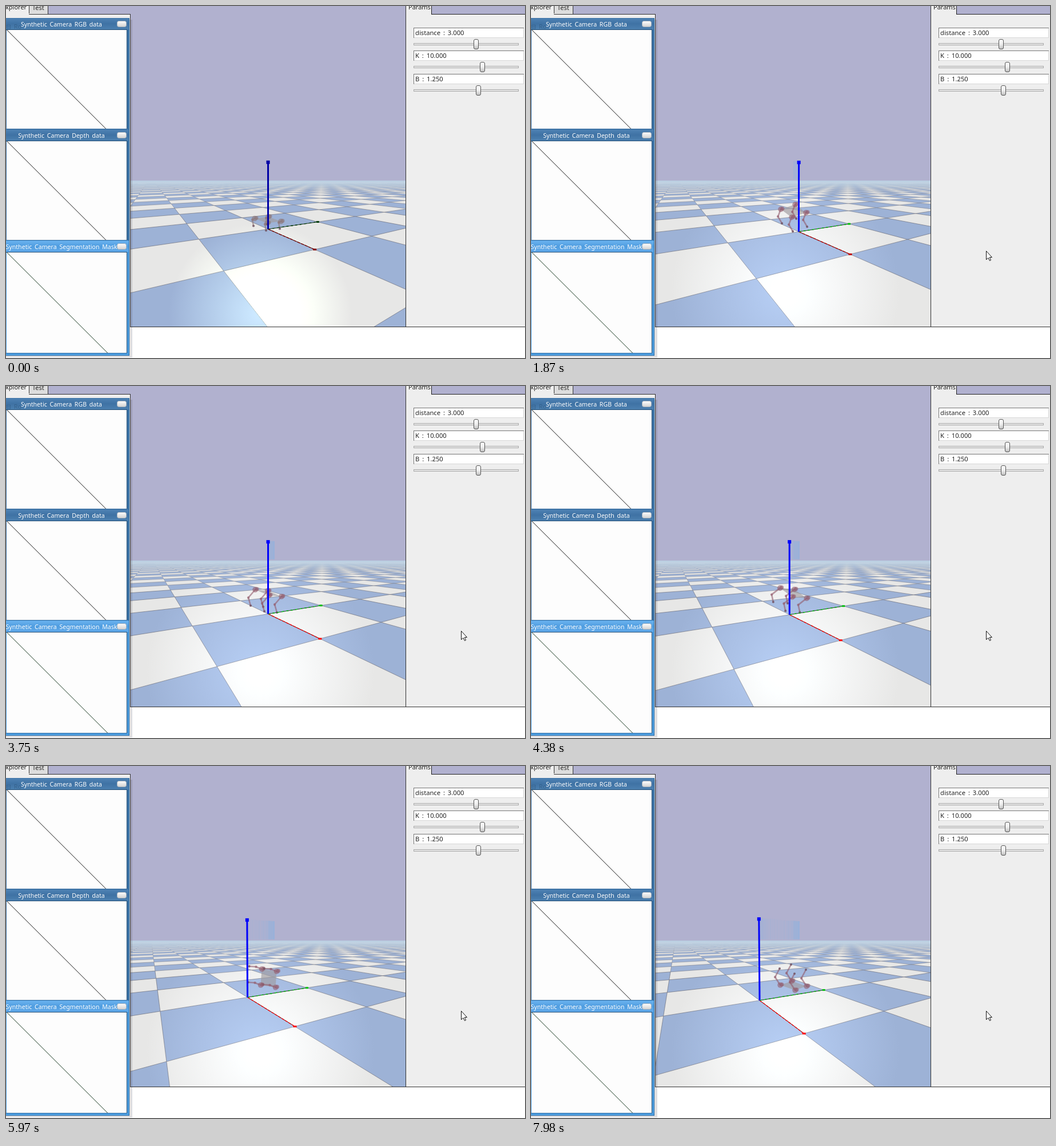
Write an HTML page with a canvas that moves like this. It is 908 px wide and 617 px high and loops after 8000 ms.

```html
<!DOCTYPE html>
<html lang="en">
<head>
<meta charset="utf-8">
<title>Quadruped simulation</title>
<style>
html, body { margin: 0; width: 100%; height: 100%; overflow: hidden; background: #fff; }
canvas { display: block; }
</style>
</head>
<body>
<canvas id="stage" width="908" height="617"></canvas>
<script>
const ctx = document.getElementById('stage').getContext('2d');
const LOOP = 8000, STEP = 69.39;
const SKY = 'rgb(177,177,207)', HORIZON = 301.3, FOCAL = 355, CENTER = 458.5;
const VIEW = { x: 218, y: 306, w: 481, h: 257 };
const FONT = '"Noto Sans", sans-serif';

// time, then depth and sideways offset of the world origin, camera height in pixels
const CAMERA = [
  [0, 3.04, 0, 273], [1870, 2.93, .0825, 277], [3750, 2.82, 0, 277], [5000, 2.75, -.116, 278],
  [5970, 2.63, -.267, 274], [6730, 2.57, -.3475, 275], [7980, 2.5, -.412, 274]
];
// time, body centre, half length, half width, knee offset, foot offset
const ROBOT = [
  [0, 458, 375, 11, 4, 12, -1.5, -4, 2, -2, 13],
  [1870, 459, 359, 9.5, 7, 12.5, -4, -5, 13, 2, 25],
  [3750, 459, 363, 11, 1, 12, 5, -12, 14, -8, 28],
  [5000, 459, 364, 14, 2, 8, 10.5, -16, 7, -16, 17],
  [5970, 459.5, 372, 13, 2, -1, 14, -10, -4, -22, -5],
  [6730, 461, 376, 12, 3, -9, 9.5, -14, -8, -20, -15],
  [7980, 459, 385, 13, 4.5, -10, 3.5, -9, -14, -1, -29]
];

const clamp01 = v => Math.max(0, Math.min(1, v));
const mix = (a, b, k) => a + (b - a) * k;

// Smooth Hermite interpolation through the rows of a key table
function sample(keys, t) {
  const last = keys.length - 1;
  let i = 0;
  while (i < last - 1 && t > keys[i + 1][0]) i++;
  const a = keys[i], b = keys[i + 1], span = b[0] - a[0], s = clamp01((t - a[0]) / span);
  const before = keys[Math.max(0, i - 1)], after = keys[Math.min(last, i + 2)];
  return a.slice(1).map((p, n) => {
    const c = n + 1, q = b[c];
    const m0 = (q - before[c]) / (b[0] - before[0]) * span;
    const m1 = (after[c] - p) / (after[0] - a[0]) * span;
    const s2 = s * s, s3 = s2 * s;
    return p * (2 * s3 - 3 * s2 + 1) + m0 * (s3 - 2 * s2 + s) + q * (3 * s2 - 2 * s3) + m1 * (s3 - s2);
  });
}

function makeView(t) {
  const [depth, side, height] = sample(CAMERA, t);
  const toEye = (x, y) => [side + .5 * x + .866 * y, depth - .866 * x + .5 * y];
  const toScreen = ([right, d], z = 0) => {
    const w = d - .05 * z;
    return [CENTER + FOCAL * right / w, HORIZON + (height - FOCAL * z) / w];
  };
  return { toEye, toScreen, point: (x, y, z) => toScreen(toEye(x, y), z) };
}

function rect(color, x, y, w, h) {
  ctx.fillStyle = color;
  ctx.fillRect(x, y, w, h);
}

function path(points, close) {
  ctx.beginPath();
  points.forEach(p => ctx.lineTo(...p));
  if (close) ctx.closePath();
}

function line(color, width, ...points) {
  path(points);
  ctx.strokeStyle = color;
  ctx.lineWidth = width;
  ctx.stroke();
}

function dot(color, [x, y], r) {
  ctx.fillStyle = color;
  ctx.beginPath();
  ctx.arc(x, y, r, 0, 7);
  ctx.fill();
}

function text(str, x, y, size, color = '#222', align = 'left') {
  ctx.font = `${size}px ${FONT}`;
  ctx.wordSpacing = '2px';
  ctx.fillStyle = color;
  ctx.textAlign = align;
  ctx.fillText(str, x, y);
}

function linear(x0, y0, x1, y1, ...colors) {
  const g = ctx.createLinearGradient(x0, y0, x1, y1);
  colors.forEach((c, i) => g.addColorStop(i / (colors.length - 1), c));
  return g;
}

// Cut a polygon where it passes behind the near plane
function clipNear(poly, near) {
  return poly.flatMap((p, i) => {
    const q = poly[(i + 1) % poly.length], out = p[1] >= near ? [p] : [];
    if ((p[1] >= near) !== (q[1] >= near)) {
      out.push([mix(p[0], q[0], (near - p[1]) / (q[1] - p[1])), near]);
    }
    return out;
  });
}

function drawFloor(view, t) {
  rect('rgb(231,231,230)', VIEW.x, VIEW.y, VIEW.w, VIEW.h);
  ctx.save();
  ctx.beginPath();
  ctx.rect(VIEW.x, VIEW.y, VIEW.w, VIEW.h);
  ctx.clip();
  for (let x = -30; x < 5; x++) {
    for (let y = -6; y < 29; y++) {
      if ((x + y) % 2 === 0) continue;
      const eye = [[x, y], [x + 1, y], [x + 1, y + 1], [x, y + 1]].map(p => view.toEye(...p));
      const far = Math.max(...eye.map(p => p[1]));
      if (far < .3 || far > 28) continue;
      path(clipNear(eye, .3).map(p => view.toScreen(p)), true);
      ctx.fillStyle = 'rgb(157,178,214)';
      ctx.fill();
      ctx.strokeStyle = `rgba(95,95,105,${Math.min(.65, 3 / far)})`;
      ctx.lineWidth = .9;
      ctx.stroke();
    }
  }
  rect(linear(0, 306, 0, 330, 'rgba(186,207,226,1)', 'rgba(188,207,225,.75)', 'rgba(195,210,226,.15)', 'rgba(200,212,226,0)'),
    VIEW.x, 306, VIEW.w, 24);

  // Specular light on the floor
  const k = clamp01(t / 900), cy = mix(540, 500, k);
  const glow = ctx.createRadialGradient(445, cy, 0, 445, cy, mix(160, 200, k));
  const tint = [mix(50, 27, k), mix(58, 30, k), mix(44, 32, k)];
  glow.addColorStop(0, `rgb(${tint})`);
  glow.addColorStop(.5, `rgb(${tint.map(v => v * .5)})`);
  glow.addColorStop(1, '#000');
  ctx.globalCompositeOperation = 'lighter';
  rect(glow, VIEW.x, 320, VIEW.w, 243);
  ctx.restore();
}

// Faint streaks left in the sky wherever the upright axis has been
function drawTrail(t) {
  for (let past = 0; past < t - 1; past += STEP) {
    const [x, y] = makeView(past).point(0, 0, 1);
    rect('rgba(150,180,218,.25)', Math.round(x), y - 2, 1, 306 - y);
  }
}

function drawRobot(t) {
  const [cx, cy, ax, ay, bx, by, kx, ky, fx, fy] = sample(ROBOT, t);
  const k = clamp01(t / 900);
  const red = `rgba(${mix(140, 146, k)},${mix(118, 92, k)},${mix(120, 108, k)},.6)`;
  const hips = [[-1, -1], [1, -1], [1, 1], [-1, 1]]
    .map(([a, b]) => [cx + a * ax + b * bx, cy + a * ay + b * by]);
  path(hips, true);
  ctx.fillStyle = 'rgba(160,155,160,.65)';
  ctx.fill();
  ctx.lineCap = ctx.lineJoin = 'round';
  for (const [x, y] of hips) {
    const knee = [x + kx, y + ky], foot = [x + fx, y + fy];
    line(red, 2.6, [x, y], knee, foot);
    dot(red, [x, y], 4.8);
    dot(red, [x + 3, y - 1], 3.5);
    dot(red, knee, 2.2);
    dot('rgba(110,80,95,.75)', foot, 2.1);
  }
  ctx.lineCap = 'butt';
  ctx.lineJoin = 'miter';
}

function drawAxes(view, t) {
  const k = clamp01(t / 900), slow = clamp01(t / 3500);
  const red = `rgb(${mix(130, 255, slow)},0,0)`, green = `rgb(0,${mix(60, 190, k)},10)`;
  const blue = `rgb(0,0,${mix(165, 250, k)})`;
  const [o, x, y, z] = [[0, 0, 0], [1, 0, 0], [0, 1, 0], [0, 0, 1]].map(p => view.point(...p));
  line('#34282a', 1, o, x);
  line('#2b4534', 1, o, y);
  ctx.setLineDash([5, 2]);
  line(red, 1.3, o, x);
  ctx.setLineDash([4, 4]);
  line(green, 1.3, o, y);
  ctx.setLineDash([]);
  line(blue, 3, o, z);
  rect(red, x[0] - 3, x[1] - 1.5, 6, 3);
  rect(green, y[0] - 2.5, y[1] - 1.5, 5, 3);
  rect(blue, z[0] - 3, z[1] - 3, 6, 6);
}

function drawParams() {
  rect('#eee', 700, 0, 208, 563);
  rect(SKY, 745, 0, 163, 14);
  rect('#222', 744, 0, 1, 14);
  rect('#222', 744, 14, 164, 1);
  rect('#333', 699, 0, 1, 563);
  text('Params', 704, 6, 11);
  [['distance : 3.000', 822], ['K : 10.000', 833], ['B : 1.250', 826]].forEach(([label, x], i) => {
    const y = Math.round(38 + i * 40.4);
    rect('#777', 713, y, 193, 18);
    rect('#d8d8d8', 714, y + 1, 192, 17);
    rect('#fff', 714, y + 1, 191, 16);
    text(label, 716, y + 12.5, 11.2);
    rect('#aaa', 713, y + 27, 184, 4);
    rect('#e6e6e6', 714, y + 28, 182, 2);
    ctx.beginPath();
    ctx.roundRect(x - 3.5, y + 20.5, 8, 17, 2.5);
    ctx.fillStyle = linear(0, y + 20, 0, y + 38, '#fff', '#eee', '#bbb');
    ctx.fill();
    ctx.strokeStyle = '#555';
    ctx.lineWidth = 1;
    ctx.stroke();
  });
}

function drawWindow(title, y, bodyHeight, colors, edge, diagonal) {
  const bottom = y + 21 + bodyHeight;
  rect(edge, 0, y, 216, bottom - y + 2);
  rect(linear(0, y, 0, y + 20, ...colors), 0, y + 1, 215, 19);
  rect('#fdfdfd', 1, y + 21, 210, bodyHeight);
  rect('#1f4b74', 211, y + 20, 1, bodyHeight + 1);
  rect('#1f4b74', 0, y + 20, 212, 1);
  line(diagonal, 1, [1.6, y + 21], [1.6 + bodyHeight, bottom]);
  text(title, 97, y + 14.5, 10.6, '#fff', 'center');
  ctx.beginPath();
  ctx.roundRect(194.5, y + 5.5, 16, 10, 3);
  ctx.fillStyle = linear(0, y + 5, 0, y + 16, '#fff', '#d0d0d0');
  ctx.fill();
  ctx.strokeStyle = '#aab4be';
  ctx.lineWidth = 1;
  ctx.stroke();
}

function drawWindows() {
  rect('#eee', 0, 0, 218, 563);
  rect(SKY, 74, 0, 144, 14);
  rect('#ddd', 41, 0, 32, 13);
  rect('#333', 73, 0, 1, 14);
  rect('#333', 40, 0, 1, 13);
  rect('#333', 40, 14, 178, 1);
  text('xplorer', -1, 6, 11);
  text('Test', 46, 7, 11);
  rect('#333', 217, 14, 1, 549);
  rect('rgba(60,60,70,.16)', 216, 24, 5, 592);
  rect('rgba(60,60,70,.16)', 0, 613, 216, 3);
  const dark = ['#4f83b5', '#3f72a4', '#4c80b0'], light = ['#6db4f0', '#4f9de0', '#62aaea'];
  drawWindow('Synthetic Camera RGB data', 21, 173, dark, '#3f74a6', '#111');
  text('⊟ Ro', 0, 40, 10.8, 'rgba(20,50,80,.3)');
  drawWindow('Synthetic Camera Depth data', 216, 173, dark, '#3f74a6', '#111');
  drawWindow('Synthetic Camera Segmentation Mask', 411, 176, light, '#4f9fe0', '#12331a');
  rect('#2b6ca6', 0, 608, 212, 1);
  rect('#4f9fe0', 0, 609, 216, 3);
  rect('#2b6ca6', 0, 612, 216, 1);
  rect('#2b6ca6', 215, 22, 1, 590);
}

function drawCursor(t) {
  if (t < 450) return;
  const s = clamp01((t - 450) / 1100), k = s * s * (3 - 2 * s);
  const x = mix(905, 796, k) + .5, y = mix(594, 429, k) + .5;
  path([[0, 0], [0, 15], [3.5, 12], [6, 17], [8, 16], [5.8, 11], [10, 11]].map(([a, b]) => [x + a, y + b]), true);
  ctx.fillStyle = '#fff';
  ctx.fill();
  ctx.strokeStyle = '#111';
  ctx.lineWidth = 1;
  ctx.stroke();
}

function draw(t) {
  const view = makeView(t);
  rect('#fff', 0, 0, 908, 617);
  rect(SKY, 0, 0, 700, 563);
  drawFloor(view, t);
  drawTrail(t);
  drawRobot(t);
  drawAxes(view, t);
  drawParams();
  rect('#333', 217, 562, 691, 1);
  drawWindows();
  drawCursor(t);
}

const start = performance.now();
function tick() {
  const elapsed = Math.max(0, performance.now() - start) % LOOP;
  draw(Math.floor(elapsed / STEP) * STEP);
  requestAnimationFrame(tick);
}
tick();
</script>
</body>
</html>
```
